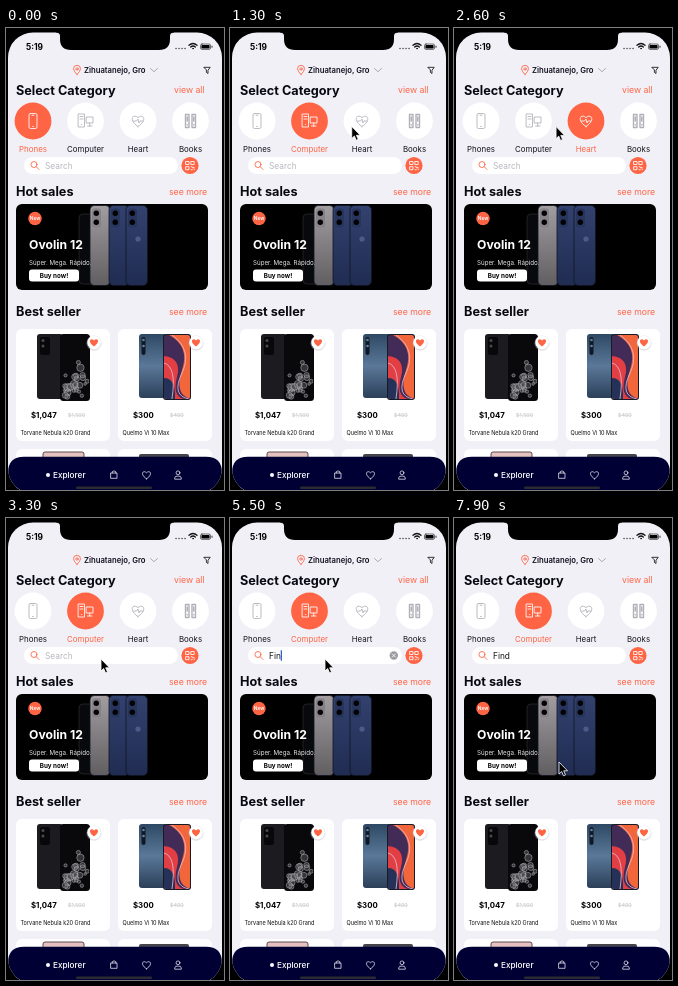
Write an HTML page that moves like this. It is 218 px wide and 462 px high and loops after 8000 ms.

```html
<!DOCTYPE html>
<html lang="en">
<head>
<meta charset="utf-8">
<title>Shop screen</title>
<style>
  html, body { margin: 0; width: 100%; height: 100%; overflow: hidden; background: #000; }
  svg { display: block; width: 218px; height: 462px; font-family: Inter, "Open Sans", sans-serif; }
  .head { font-size: 12.7px; font-weight: 700; fill: #080810; }
  .link { font-size: 8.7px; fill: #ff6444; }
  .label { font-size: 7.9px; text-anchor: middle; }
  .line { fill: none; stroke-width: .85; stroke-linecap: round; stroke-linejoin: round; }
  .price { font-size: 7.8px; font-weight: 700; }
  .old { font-size: 5.4px; fill: #c4c4c8; text-decoration: line-through; }
  .name { font-size: 5.5px; fill: #111; }
</style>
</head>
<body>
<svg viewBox="0 0 218 462">
  <defs>
    <clipPath id="screen"><rect x="2" y="4.5" width="214" height="461" rx="25"/></clipPath>
    <clipPath id="promo"><rect x="10" y="176" width="192" height="86" rx="6"/></clipPath>
    <clipPath id="bubbleScreen"><rect x="55" y="307" width="28" height="65" rx="3"/></clipPath>
    <clipPath id="swirlScreen"><rect x="158" y="307" width="26" height="64" rx="2.5"/></clipPath>
    <linearGradient id="steel" x2="0" y2="1"><stop stop-color="#a19da0"/><stop offset="1" stop-color="#615e62"/></linearGradient>
    <linearGradient id="navy" x2="0" y2="1"><stop stop-color="#33416e"/><stop offset="1" stop-color="#202c52"/></linearGradient>
    <linearGradient id="teal" x2="0" y2="1"><stop stop-color="#2e4964"/><stop offset=".5" stop-color="#5a7899"/><stop offset="1" stop-color="#2c4059"/></linearGradient>
    <path id="heart" d="M0 3.8C-7-.6-3.5-5.5 0-2.3C3.5-5.5 7-.6 0 3.8Z"/>
  </defs>

  <g clip-path="url(#screen)">
    <path d="M0 0H218V462H0Z" fill="#f1f0f7"/>
    <text x="20" y="21.5" font-size="8.4" font-weight="700">5:19</text>
    <g class="line" stroke="#111">
      <path d="M170 20.5h.1M173 20.5h.1M176 20.5h.1M179 20.5h.1" stroke-width="1.5" opacity=".75"/>
      <path d="M183 17.2Q187 13.7 191 17.2M184.7 19Q187 17 189.3 19" stroke-width="1.3"/>
      <circle cx="187" cy="20.6" r=".5"/>
      <rect x="194.5" y="16" width="10" height="5.4" rx="1.5" stroke-width=".6"/>
      <path d="M206 18.1v1.2"/>
      <path d="M198.2 39.3H204.2L202 42.3V45.5L200.4 44.4V42.3Z"/>
    </g>
    <rect x="195.4" y="16.9" width="8.2" height="3.6" rx=".8"/>
    <g class="line" stroke="#ff6444">
      <path d="M71 46.5Q67.5 43 67.5 40.8A3.5 3.5 0 0 1 74.5 40.8Q74.5 43 71 46.5Z"/>
      <circle cx="71" cy="41" r="1.2"/>
    </g>
    <text x="78" y="44.7" font-size="7.7" font-weight="600" fill="#11111e">Zihuatanejo, Gro</text>
    <path class="line" d="M144.5 40.5L148 43.7L151.5 40.5" stroke="#9d9da7"/>

    <text class="head" x="10" y="67">Select Category</text>
    <text class="link" x="168" y="65.3">view all</text>
    <g id="categories"></g>

    <rect x="18" y="129" width="154" height="17" rx="8.5" fill="#fff"/>
    <g class="line" stroke="#ff6444" stroke-width="1"><circle cx="28" cy="136.5" r="3"/><path d="M30.3 138.8L33 141.5"/></g>
    <text id="query" x="39" y="140.6" font-size="8.3"></text>
    <path id="caret" d="M0 132.3V142.7" stroke="#2456cf" stroke-width="1.2"/>
    <g id="clear"><circle cx="163.8" cy="137.5" r="4.2" fill="#9b9ba1"/><path class="line" d="M162.2 135.9l3.2 3.2m0-3.2l-3.2 3.2" stroke="#fff"/></g>
    <circle cx="184" cy="137.5" r="8.6" fill="#ff6444"/>
    <g class="line" stroke="#fff"><path d="M180 133.5h3v3h-3ZM185.2 133.5h3v3h-3ZM180 138.7h3v3h-3ZM185.2 138.7h1v1h2M185.2 141.7h1M188.2 141v.7"/></g>

    <text class="head" x="10" y="168">Hot sales</text>
    <text class="link" x="163" y="167">see more</text>
    <g clip-path="url(#promo)">
      <path d="M10 176H202V262H10Z"/>
      <path d="M73 190Q73 186 77 186H88V256H77Q73 256 73 252Z" fill="#08090d" stroke="#34343a" stroke-width=".6"/>
      <g id="handsets"></g>
      <circle cx="132" cy="211" r="2.6" fill="#4c5b89"/>
      <circle cx="29" cy="190.5" r="6.7" fill="#ff6444"/>
      <text x="29" y="192.4" font-size="4.9" font-weight="600" fill="#fff" text-anchor="middle">New</text>
      <text x="23" y="220.5" font-size="12.2" font-weight="700" fill="#fff">Ovolin 12</text>
      <text x="23" y="237" font-size="6.2" fill="#e4e4e4">Súper. Mega. Rápido.</text>
      <rect x="23" y="241.5" width="50" height="12" rx="3" fill="#fff"/>
      <text x="48" y="249.8" font-size="6.3" font-weight="700" text-anchor="middle">Buy now!</text>
    </g>

    <text class="head" x="10" y="288">Best seller</text>
    <text class="link" x="163" y="287">see more</text>
    <g id="cards"></g>

    <path d="M2 466V445Q2 428.7 18 428.7H200Q216 428.7 216 445V466Z" fill="#010035"/>
    <rect x="70" y="458.4" width="76" height="2.6" rx="1.3" fill="#2b2b31"/>
    <circle cx="42" cy="447" r="2" fill="#fff"/>
    <text x="47" y="450" font-size="8.2" font-weight="500" fill="#fff">Explorer</text>
    <g class="line" stroke="#fff" style="stroke-width:.7">
      <path d="M105 445H111V450.3H105ZM106.2 445V443.7Q108 442 109.8 443.7V445"/>
      <use href="#heart" x="140.5" y="447"/>
      <circle cx="172" cy="444.8" r="1.9"/><path d="M168.7 450.8V450Q168.7 448 172 448T175.3 450V450.8Z"/>
    </g>
  </g>
  <path d="M50 0V4.5Q54 4.5 54 8V11Q54 22 65 22H153Q164 22 164 11V8Q164 4.5 168 4.5V0Z"/>
  <path id="cursor" d="M0 0V12L2.7 9.5L4.5 13.8L6.5 12.9L4.7 8.8H8.5Z" stroke="#fff" stroke-width=".8"/>
</svg>
<script>
const LOOP = 8000, STEP = 100, ACCENT = "#ff6444";
const $ = id => document.getElementById(id);

const categories = [
  ["Phones", '<rect x="-4" y="-7.5" width="8" height="15" rx="1.5"/><path d="M-1-5.8H1M-.4 5.5H.4"/>'],
  ["Computer", '<path d="M-7-7H-1V6H-7ZM-5.5-4.5H-2.5M-5.5-2H-2.5M-4 3.5h.2M1-4H7.5V2H1ZM4.2 2V5M2 5H6.5"/>'],
  ["Heart", '<use href="#heart" transform="scale(1.45)" stroke-width=".6"/><path d="M-4.5 0H-1.5L0-2L1 2L2 0H4.5"/>'],
  ["Books", '<path d="M-5-6.5H-1.5V6.5H-5ZM1.5-6.5H5V6.5H1.5ZM-3.2-4V0M3.2-4V0M-3.2 3.7h.1M3.2 3.7h.1" stroke-width="1.4"/>']
];
$("categories").innerHTML = categories.map(([name, icon], i) => `
  <g transform="translate(${27 + i * 52.5} 93)">
    <circle r="18.4"/><g class="line">${icon}</g><text class="label" y="30.7">${name}</text>
  </g>`).join("");

const handset = (x, width, body, lens) => `
  <rect x="${x}" y="177.5" width="${width}" height="80" rx="4.5" fill="url(#${body})" stroke="#111524" stroke-width=".8"/>
  <rect x="${x + 2}" y="180.5" width="9" height="19" rx="3" fill="${lens}"/>
  <circle cx="${x + 6.3}" cy="185.3" r="2.7"/><circle cx="${x + 6.3}" cy="194.3" r="2.7"/>`;
$("handsets").innerHTML = handset(84, 20, "steel", "#858186")
  + handset(103, 20, "navy", "#27345c") + handset(120, 21.5, "navy", "#27345c");

// Repeatable scatter in the range 0 to 1.
const scatter = n => Math.abs(Math.sin(n * 127.1) * 43758.5) % 1;
const bubbles = Array.from({ length: 26 }, (_, i) => {
  const depth = Math.sqrt(scatter(i + 1));
  return `<circle cx="${57 + scatter(i + 41) * 25}" cy="${328 + depth * 41}" r="${1 + scatter(i + 81) * 3}"/>`;
}).join("");

const devices = [
  `<rect x="31" y="306" width="26" height="65" rx="3" fill="#1c1c20"/>
   <rect x="34" y="309" width="10" height="18" rx="2" fill="#08080a"/>
   <circle cx="37" cy="312.5" r="1.5" fill="#484a50"/><circle cx="37" cy="318" r="1.5" fill="#484a50"/>
   <rect x="54" y="306" width="30" height="67" rx="3.5" fill="#09090b"/>
   <g clip-path="url(#bubbleScreen)" fill="#77777b" fill-opacity=".4" stroke="#bdbdc0" stroke-width=".5">${bubbles}</g>`,
  `<rect x="133" y="306" width="28" height="64" rx="3" fill="url(#teal)"/>
   <rect x="135.5" y="309" width="4" height="18" rx="2" fill="#101923"/>
   <circle cx="137.5" cy="312" r="1.3" fill="#678097"/><circle cx="137.5" cy="318" r="1.3" fill="#678097"/>
   <rect x="157" y="306" width="28" height="66" rx="3" fill="#171b27"/>
   <g clip-path="url(#swirlScreen)">
     <path d="M158 307H184V371H158Z" fill="#422b57"/>
     <path d="M163 307Q184 318 176 342T184 371V307Z" fill="#f1663b"/>
     <path d="M158 328Q176 330 171 349T178 371H158Z" fill="#e23f45"/>
     <path d="M158 350Q170 350 169 371H158Z" fill="#263158"/>
     <path class="line" d="M166 307Q187 322 176 345T183 371M158 335Q171 338 166 371" stroke="#e6b7d0"/>
   </g>`
];
const card = (i, price, old, name) => {
  const x = 10 + i * 102, heartX = x + 78;
  return `
  <rect x="${x}" y="301" width="94" height="112" rx="6" fill="#fff"/>
  <rect x="${x}" y="421" width="94" height="50" rx="6" fill="#fff"/>
  ${devices[i]}
  <circle cx="${heartX}" cy="315.2" r="7.6" fill="#b9b8c4" opacity=".4"/>
  <circle cx="${heartX}" cy="314.5" r="6.8" fill="#fff"/>
  <use href="#heart" x="${heartX}" y="314.7" fill="${ACCENT}"/>
  <text class="price" x="${x + 15}" y="389.5">${price}</text>
  <text class="old" x="${x + 52}" y="388.8">${old}</text>
  <text class="name" x="${x + 4.5}" y="406.5">${name}</text>`;
};
$("cards").innerHTML = card(0, "$1,047", "$1,500", "Torvane Nebula k20 Grand")
  + card(1, "$300", "$400", "Quelmo Vi 10 Max")
  + `<rect x="37" y="424" width="41" height="20" rx="2" fill="#e5c2c0" stroke="#37292c" stroke-width=".8"/>
     <rect x="133" y="426" width="50" height="20" rx="2" fill="#45444c"/>`;

// Each entry holds its start time first.
const selections = [[0, 0], [1000, 1], [1400, 2], [1800, 3], [2300, 2], [2800, 1]];
const typing = [[0, ""], [4500, "F"], [5000, "Fi"], [5400, "Fin"], [5800, "Find"]];
const path = [
  [100, 218, 300], [600, 76, 108], [800, 76, 108], [1000, 77, 101], [1400, 130, 98], [1800, 176, 95],
  [2100, 176, 95], [2400, 133, 98], [2750, 82, 99], [2900, 82, 99], [3200, 95, 141],
  [7300, 95, 141], [7900, 105, 244]
];
const FOCUS = 3600, BLUR = 6500;

const latest = (list, t) => list.filter(entry => entry[0] <= t).pop()[1];
const show = (node, on) => node.setAttribute("visibility", on ? "visible" : "hidden");

function cursorAt(t) {
  const next = path.findIndex(p => p[0] >= t);
  if (next < 1) return path[0].slice(1);
  const [t0, x0, y0] = path[next - 1], [t1, x1, y1] = path[next];
  const u = (t - t0) / (t1 - t0), k = u * u * (3 - 2 * u);
  return [x0 + (x1 - x0) * k, y0 + (y1 - y0) * k];
}

function render(time) {
  const t = Math.floor(time % LOOP / STEP) * STEP;
  const selected = latest(selections, t), text = latest(typing, t);
  [...$("categories").children].forEach((group, i) => {
    const [circle, icon, label] = group.children, on = i === selected;
    circle.setAttribute("fill", on ? ACCENT : "#fff");
    icon.setAttribute("stroke", on ? "#fff" : "#b0b0b9");
    label.setAttribute("fill", on ? ACCENT : "#15151e");
  });
  $("query").textContent = text || "Search";
  $("query").setAttribute("fill", text ? "#111" : "#b7b7bd");
  const focused = t >= FOCUS && t < BLUR;
  const caretX = 39.5 + (text ? $("query").getComputedTextLength() : 0);
  $("caret").setAttribute("transform", `translate(${caretX} 0)`);
  // The caret stays solid for a moment after each key, then blinks.
  const lastKey = Math.max(FOCUS, ...typing.map(key => key[0]).filter(start => start <= t));
  show($("caret"), focused && (t - lastKey) % 1000 < 600);
  show($("clear"), focused && text);
  const [x, y] = cursorAt(t);
  $("cursor").setAttribute("transform", `translate(${x} ${y})`);
  show($("cursor"), t >= 100);
}

function tick() {
  render(performance.now());
  requestAnimationFrame(tick);
}
tick();
</script>
</body>
</html>
```
